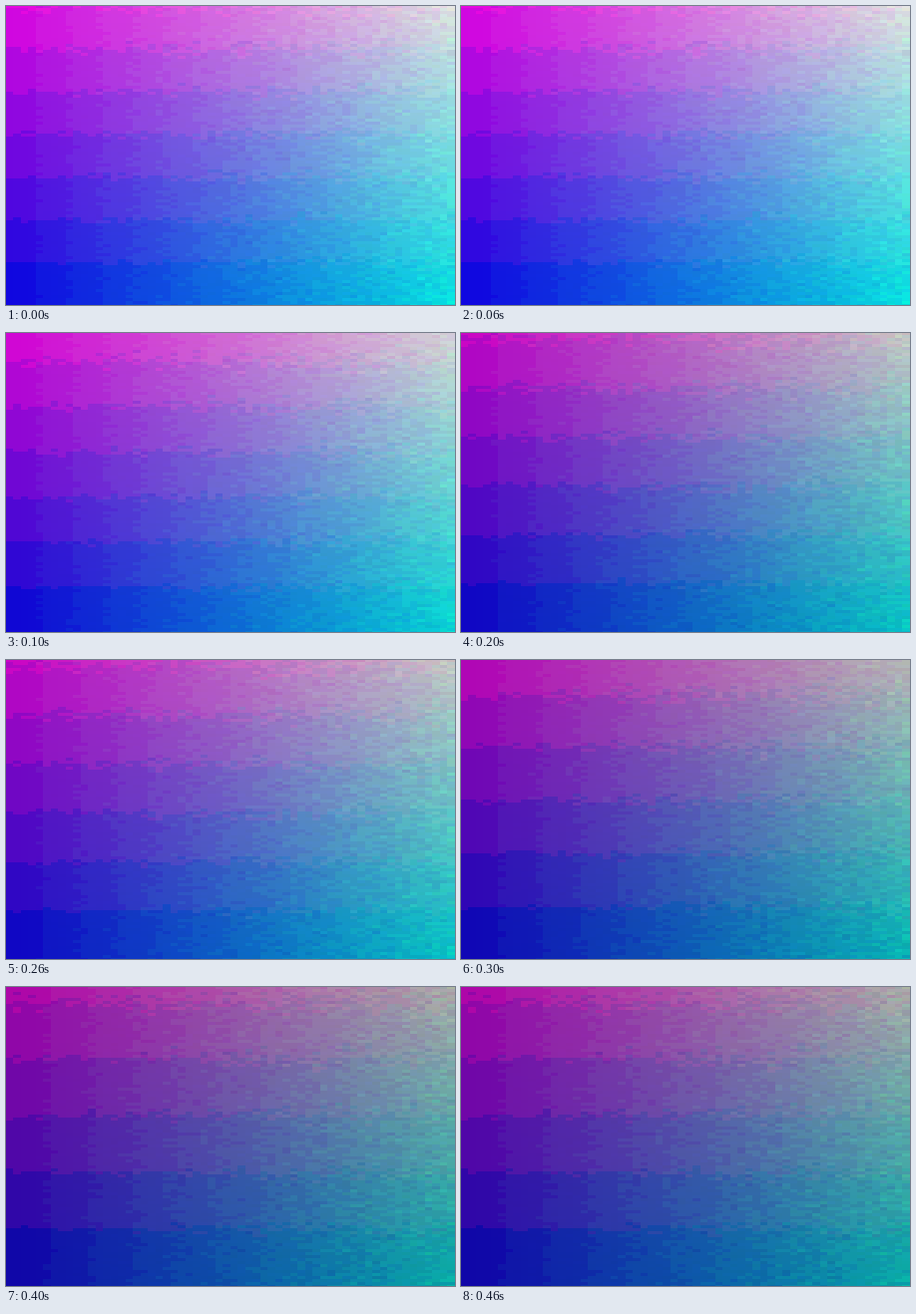
Write an HTML page with a canvas that moves like this. It is 450x300 px and loops after 0.5 s.

```html
<!DOCTYPE html>
<html lang="en">
<head>
<meta charset="utf-8">
<title>Dimming colour field</title>
<style>
  html, body { margin: 0; width: 100%; height: 100%; overflow: hidden; background: #00d; }
  canvas { display: block; width: 450px; height: 300px; }
</style>
</head>
<body>
<canvas id="field" width="450" height="300"></canvas>
<script>
const W = 450, H = 300, COLS = 60, ROWS = 100, STEP_MS = 100;
const PEAKS = [224, 212, 196, 181, 168];  // brightness of each step
const ctx = document.getElementById('field').getContext('2d');

function seeded(seed) {
  return () => {
    seed = (seed + 0x6D2B79F5) | 0;
    let n = Math.imul(seed ^ (seed >>> 15), 1 | seed);
    n = (n + Math.imul(n ^ (n >>> 7), 61 | n)) ^ n;
    return ((n ^ (n >>> 14)) >>> 0) / 4294967296;
  };
}

const mix = (a, b, k) => a + (b - a) * k;

// Middle of the band that a value falls in, after a nudge in band widths.
const band = (value, size, nudge) =>
  (Math.max(0, Math.floor(value / size + nudge)) + 0.5) * size;

// Red falls with height, green grows to the right; both in coarse bands.
function paint(peak, seed) {
  const canvas = document.createElement('canvas');
  canvas.width = W;
  canvas.height = H;
  const g = canvas.getContext('2d');
  const rand = seeded(seed);
  const jitter = () => rand() + rand() - 1;
  for (let row = 0; row <= ROWS; row++) {
    const up = 1 - row / ROWS;
    for (let col = 0; col < COLS; col++) {
      const u = col / COLS;
      const red = peak * up, green = peak * (col + 0.5) / COLS;
      const bandR = band(red, 32, jitter() * (0.04 + 0.2 * up * up + 0.25 * u));
      const bandG = band(green, 16, jitter() * (0.05 + 1.4 * u));
      const r = Math.min(peak + 6, mix(bandR, red, 0.6 * u));
      const gr = mix(bandG, green, 0.2);
      const b = peak + jitter() * 10 * u;
      g.fillStyle = `rgb(${Math.round(r)}, ${Math.round(gr)}, ${Math.round(b)})`;
      g.fillRect(Math.floor(col * W / COLS), row * H / ROWS - 1, 8, 3);
    }
  }
  return canvas;
}

const steps = PEAKS.map((peak, i) => paint(peak, 41 + i * 97));
const start = performance.now();
let shown = -1;

function draw(now) {
  const i = Math.floor(Math.max(0, now - start) / STEP_MS) % steps.length;
  if (i !== shown) ctx.drawImage(steps[shown = i], 0, 0);
  requestAnimationFrame(draw);
}

draw(start);
</script>
</body>
</html>
```
